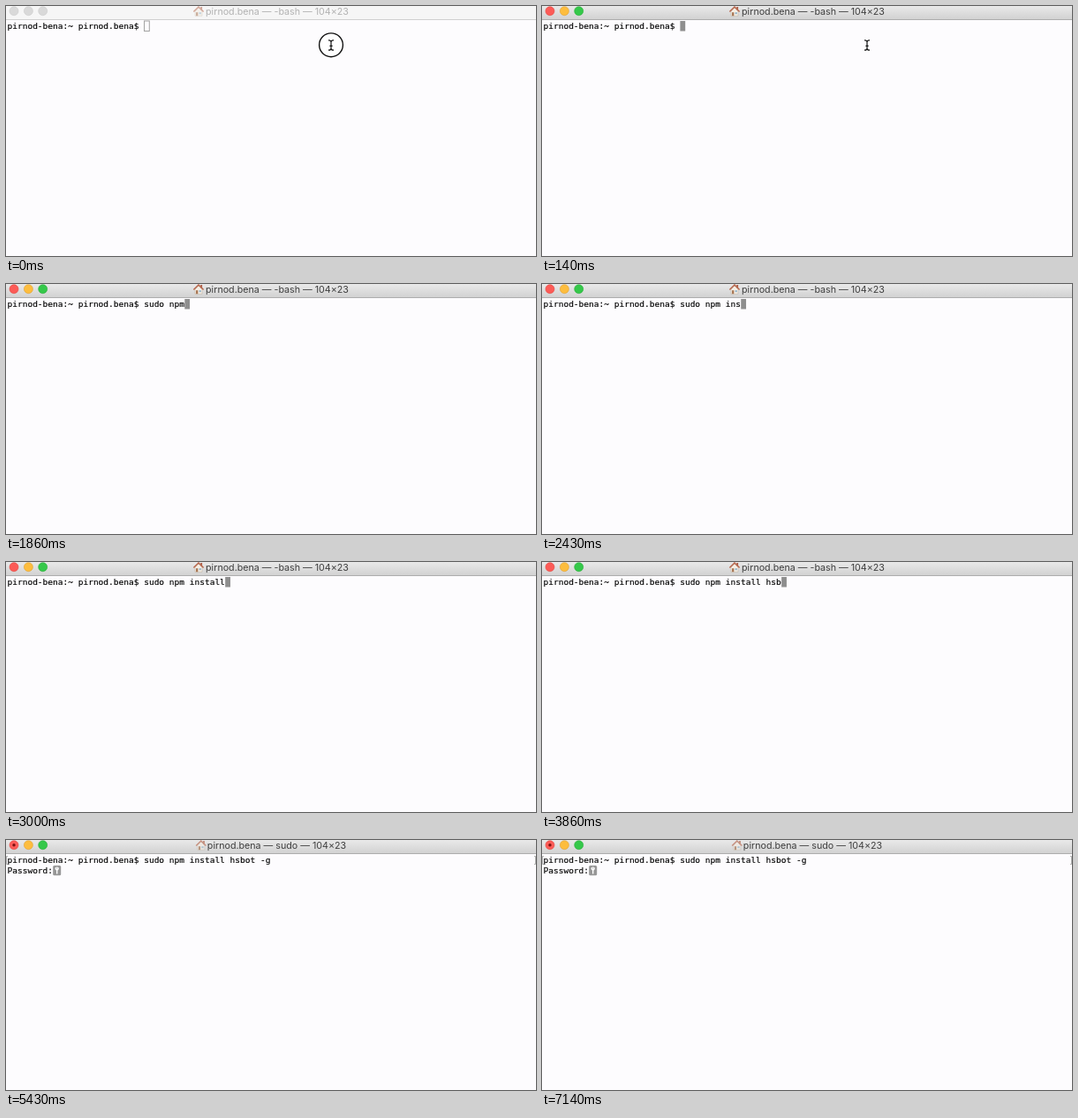
These frames come from a looping animation (600 by 284 pixels, 8 s). An HTML page:

```html
<!DOCTYPE html>
<html lang="en">
<head>
<meta charset="utf-8">
<title>Terminal</title>
<style>
html, body { margin: 0; height: 100%; overflow: hidden; background: #fdfcfe; }
svg { display: block; }
.mono { font: 9.53px "DejaVu Sans Mono", monospace; white-space: pre; stroke: #000; stroke-width: .15px; }
#title { font: 10.7px Inter, sans-serif; text-anchor: middle; fill: #3e3e3e; }
.idle #title { fill: #b2b2b2; }
.idle #lights circle { fill: #d9d9d9; stroke: #cbcbcb; }
.idle #house { opacity: .55; }
.busy #house { opacity: .65; }
.idle #bar { fill: #f6f6f6; }
.idle #edge { fill: #d0d0d0; }
.idle #cursor { fill: none; stroke: #a2a2a2; }
#cursor { fill: #8e8e8e; }
#bar { fill: url(#metal); }
#edge { fill: #adadad; }
</style>
</head>
<body>
<svg id="stage" width="600" height="284" viewBox="0 0 600 284">
  <defs>
    <linearGradient id="metal" x2="0" y2="1">
      <stop stop-color="#e9e9e9"/><stop offset="1" stop-color="#d2d2d2"/>
    </linearGradient>
  </defs>
  <rect width="600" height="284" fill="#fdfcfe"/>
  <rect id="bar" width="600" height="15"/>
  <rect id="edge" y="15" width="600" height="1"/>
  <g id="lights" stroke-width=".6">
    <circle cx="9" cy="5.7" r="5" fill="#fc5b57" stroke="#e2463f"/>
    <circle cx="25.4" cy="5.7" r="5" fill="#fdbd3e" stroke="#e0a032"/>
    <circle cx="41.7" cy="5.7" r="5" fill="#35c84a" stroke="#24ad34"/>
  </g>
  <circle id="dot" cx="9" cy="5.7" r="1.7" fill="#7c1210"/>
  <g id="house">
    <path d="M8.3 1h1.8v4H8.3z" fill="#a9583f"/>
    <path d="M2 6 6 2l4 4v5.3H2z" fill="#f5eee4" stroke="#b9aa9a" stroke-width=".5"/>
    <path d="M.4 6.5 6 1l5.6 5.5" fill="none" stroke="#b9674d" stroke-width="1.5"/>
    <path d="M3.1 7.2h2.2v4H3.1z" fill="#a5714e"/>
    <path d="M6.6 7.2h2.2v2H6.6z" fill="#8fb3cc"/>
  </g>
  <text id="title" y="10"></text>
  <text id="line" class="mono" x="1.5" y="26"></text>
  <g id="marks" fill="none" stroke="#a8a8a8">
    <path d="M2 18.5H.5v9H2M598 18.5h1.5v9H598"/>
  </g>
  <text id="ask" class="mono" x="1.5" y="37.6">Password:</text>
  <rect id="cursor" width="5.8" height="11.5"/>
  <g id="key">
    <rect x="53.2" y="29" width="9" height="11.3" rx="1.5" fill="#979797"/>
    <circle cx="57.7" cy="32.6" r="2.1" fill="#fff"/>
    <path d="M57.7 34v4.6" stroke="#fff" stroke-width="1.4"/>
    <circle cx="57.7" cy="31.9" r=".6" fill="#979797"/>
  </g>
  <g id="pointer" fill="none" stroke="#111">
    <circle id="ring" cx="368" cy="44.3" r="13.4" stroke-width="1.4" fill="#fff"/>
    <path d="M365 38.8q3 0 3 2 0-2 3-2M368 40v9M365 50.2q3 0 3-2 0 2 3 2M366.4 45.4h3.2" stroke-width="1.2"/>
  </g>
</svg>
<script>
const $ = id => document.getElementById(id);
const LOOP = 8000, CELL = 5.737, LEFT = 1.5;
const prompt = "pirnod-bena:~ pirnod.bena$ ";
const command = "sudo npm install hsbot -g";
// Bursts of typing: start time and number of keys, one key per TICK.
const TICK = 1000 / 7;
const bursts = [[710, 7], [1860, 8], [3000, 4], [3860, 4], [4570, 2]];
const ENTER = 5000, ASK = 5140;

const typed = t => bursts.reduce((sum, [start, keys]) =>
  sum + Math.max(0, Math.min(keys, Math.floor((t - start + 6) / TICK) + 1)), 0);
const show = (id, on) => $(id).style.display = on ? "" : "none";

function draw(t) {
  const idle = t < 140, entered = t >= ENTER, busy = t >= ASK;
  const count = typed(t);
  const mid = busy ? 306.5 : 307;
  $("stage").setAttribute("class", idle ? "idle" : busy ? "busy" : "");
  $("title").textContent = `pirnod.bena — ${busy ? "sudo" : "-bash"} — 104×23`;
  $("title").setAttribute("x", mid);
  $("house").setAttribute("transform", `translate(${busy ? 214.8 : 212} 0)`);
  $("line").textContent = prompt + command.slice(0, count);
  const x = LEFT + (entered ? 0 : (prompt.length + count) * CELL);
  $("cursor").setAttribute("x", idle ? x + .1 : x);
  $("cursor").setAttribute("y", entered ? 28.6 : 17);
  show("cursor", !busy);
  show("marks", entered);
  show("ask", busy);
  show("key", busy);
  show("dot", busy);
  show("ring", idle);
  show("pointer", count === 0);
}

function tick() {
  draw(performance.now() % LOOP);
  requestAnimationFrame(tick);
}
tick();
</script>
</body>
</html>
```
